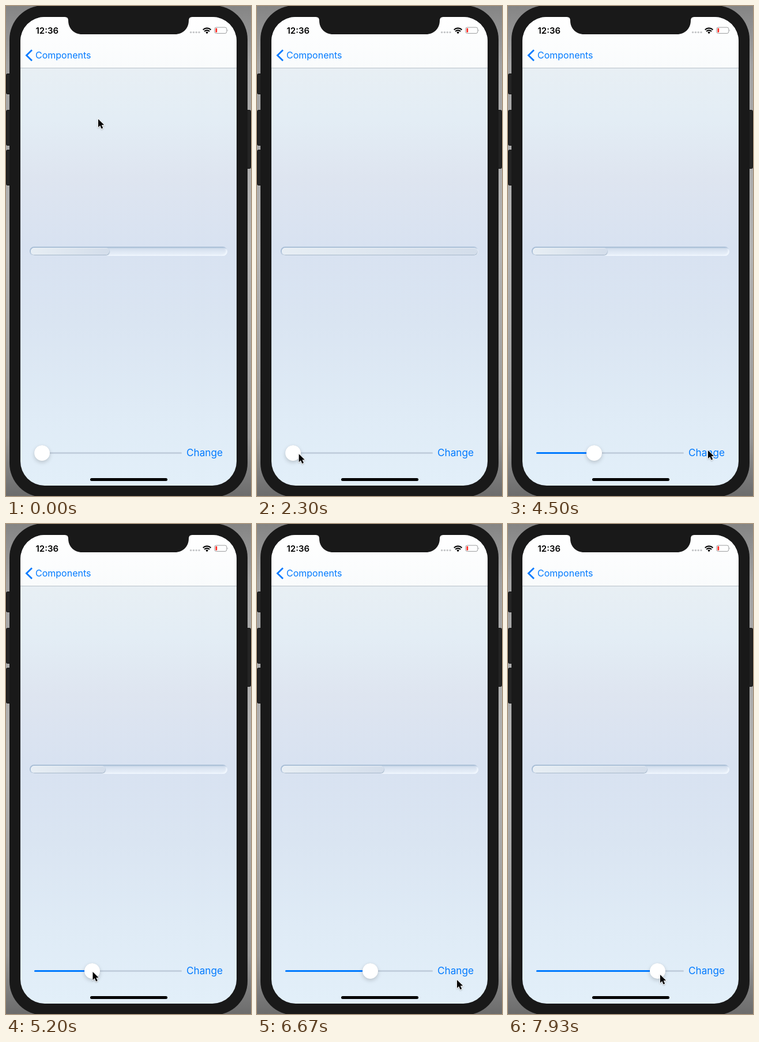
These frames come from a looping animation (425x849 px, 8000 ms). An HTML page:

```html
<!DOCTYPE html>
<html lang="en">
<head>
<meta charset="utf-8">
<title>Progress bar</title>
<style>
  html, body { margin: 0; width: 100%; height: 100%; overflow: hidden; }
  body { position: relative; background: #999; }
  svg { position: absolute; left: 0; top: 0; display: block; overflow: visible; }
  text { font-family: Inter, "Liberation Sans", sans-serif; }
  .link { fill: #007aff; }
  div { position: absolute; box-sizing: border-box; }
  #track {
    left: 41px; top: 417px; width: 343px; height: 16px; border-radius: 8px;
    background: linear-gradient(#cbd8e9, #dfe8f4 55%, #eaf2fb);
    box-shadow: inset 2px 2px 2px #a5bbd4, inset -2px -1px 3px #f2f8ff;
  }
  #fill {
    left: 43px; top: 419px; height: 12px; border-radius: 6px;
    background: linear-gradient(90deg, #e7eef4, #d3ddea);
    box-shadow: .5px 1px 1.5px #93a7be, inset .5px .5px 1px #eef4fa;
  }
  .rail { left: 49px; top: 773px; height: 3px; border-radius: 1.5px; }
  #rest { width: 256px; background: #c3d0de; }
  #done { background: #007aff; }
  #thumb {
    left: 0; top: 760.5px; width: 27px; height: 27px; border-radius: 50%;
    background: #fff; box-shadow: 0 3px 7px rgba(0,0,0,.17), 0 0 1px rgba(0,0,0,.12);
  }
</style>
</head>
<body>
<svg width="425" height="849" viewBox="0 0 425 849">
  <defs>
    <linearGradient id="desk" x2="0" y2="1">
      <stop stop-color="#858585"/><stop offset=".12" stop-color="#a3a3a3"/>
      <stop offset=".5" stop-color="#b4b4b4"/><stop offset=".88" stop-color="#979797"/>
      <stop offset="1" stop-color="#6c6c6c"/>
    </linearGradient>
    <linearGradient id="sky" gradientUnits="userSpaceOnUse" x1="0" y1="19" x2="0" y2="831">
      <stop offset=".1" stop-color="#e8eff4"/><stop offset=".22" stop-color="#e3edf5"/>
      <stop offset=".34" stop-color="#dee5f0"/><stop offset=".49" stop-color="#d8e2f1"/>
      <stop offset=".66" stop-color="#dae5f2"/><stop offset=".84" stop-color="#dfebf6"/>
      <stop offset="1" stop-color="#e2eff9"/>
    </linearGradient>
    <linearGradient id="nav" x2="0" y2="1">
      <stop stop-color="#fff"/><stop offset="1" stop-color="#f9fbfc"/>
    </linearGradient>
    <clipPath id="screen"><rect x="25" y="19" width="375" height="812" rx="42"/></clipPath>
  </defs>

  <rect width="425" height="849" fill="url(#desk)"/>
  <g fill="#242424" stroke="#101010">
    <rect x=".5" y="117.5" width="9" height="35" rx="2"/>
    <rect x=".5" y="180.5" width="9" height="61" rx="2"/>
    <rect x=".5" y="249.5" width="9" height="61" rx="2"/>
    <rect x="415.5" y="180.5" width="9" height="101" rx="2"/>
  </g>
  <rect x="6" y="-1" width="413" height="852" rx="59" fill="#191919"/>

  <g clip-path="url(#screen)">
    <rect x="25" y="19" width="375" height="812" fill="url(#sky)"/>
    <rect x="25" y="19" width="375" height="88" fill="url(#nav)"/>
    <rect x="25" y="107" width="375" height="1" fill="#b9c1c8"/>
  </g>
  <path d="M102 18v1q6 0 6 6c0 14 10 24 24 24h161c14 0 24-10 24-24q0-6 6-6v-1z" fill="#191919"/>

  <text x="51.5" y="47.5" font-size="15" font-weight="600">12:36</text>
  <g fill="#c2c4c6">
    <circle cx="320.6" cy="45.6" r="1.7"/><circle cx="325.4" cy="45.6" r="1.7"/>
    <circle cx="330.2" cy="45.6" r="1.7"/><circle cx="335" cy="45.6" r="1.7"/>
  </g>
  <g fill="none" stroke="#000" stroke-width="2.2">
    <path d="M341.8 41.2a9.8 9.8 0 0 1 13.6 0"/>
    <path d="M344.2 44a6.3 6.3 0 0 1 8.8 0"/>
  </g>
  <path d="M348.6 48.2l-2.3-2.5a3.3 3.3 0 0 1 4.6 0z"/>
  <rect x="361.8" y="37" width="21" height="10.4" rx="2.8" fill="none" stroke="#9b9c9d"/>
  <path d="M384.2 40.4q1.7 1.8 0 3.6z" fill="#9b9c9d"/>
  <rect x="363.4" y="38.6" width="2.8" height="7.2" rx="1" fill="#ff2d25"/>

  <path d="M45 76.3l-9.5 9.2 9.5 9.2" fill="none" stroke="#007aff" stroke-width="2.8"/>
  <text class="link" x="51" y="91" font-size="16">Components</text>
  <text class="link" x="313" y="780" font-size="17.2">Change</text>
  <rect x="146" y="818" width="134" height="5" rx="2.5"/>
</svg>

<div id="track"></div>
<div id="fill"></div>
<div id="rest" class="rail"></div>
<div id="done" class="rail"></div>
<div id="thumb"></div>
<svg id="cursor" width="12" height="18" viewBox="0 0 12 18">
  <path d="M0 0v14l3.2-3 2.4 5.6 2.6-1.1-2.4-5.4h4.3z" stroke="#fff" stroke-width="1.6"
        paint-order="stroke" style="filter:drop-shadow(0 1px 1px rgba(0,0,0,.25))"/>
</svg>

<script>
const LOOP = 8000;
const out = k => 1 - (1 - k) ** 2;
const glide = k => k < .5 ? 4 * k ** 3 : 1 - 4 * (1 - k) ** 3;
const drag = k => k < .5 ? 2 * k * k : 1 - 2 * (1 - k) ** 2;

// Each move: start ms, end ms, value reached, easing
const progress = { from: [.4], moves: [
  [145, 330, [.6], out], [605, 830, [.8], out], [1145, 1330, [1], out],
  [3605, 4030, [.38], out], [6590, 6770, [.585], out]
] };
const knob = { from: [62.5], moves: [
  [2550, 2930, [149.5], drag], [5380, 5730, [196.5], drag], [7350, 7930, [259.5], drag]
] };
const pointer = { from: [160, 196], moves: [
  [1610, 2400, [72, 781], glide], [2550, 2930, [159, 781], drag],
  [3050, 3470, [347, 770], glide], [4480, 5270, [150, 776], glide],
  [5380, 5730, [197, 776], drag], [5880, 6480, [347, 790], glide],
  [6910, 7200, [200, 779], glide], [7350, 7930, [264, 781], drag]
] };

function valueAt({ from, moves }, t) {
  let now = from;
  for (const [start, end, to, ease] of moves) {
    if (t < start) break;
    const k = ease(Math.min(1, (t - start) / (end - start)));
    now = now.map((v, i) => v + (to[i] - v) * k);
  }
  return now;
}

const style = id => document.getElementById(id).style;
const fill = style('fill'), done = style('done'), thumb = style('thumb'), cursor = style('cursor');

function draw(t) {
  const [p] = valueAt(progress, t);
  const [x] = valueAt(knob, t);
  const [cx, cy] = valueAt(pointer, t);
  fill.width = 339 * p + 'px';
  done.width = x - 49 + 'px';
  thumb.transform = `translateX(${x - 13.5}px)`;
  cursor.transform = `translate(${cx}px, ${cy}px)`;
}

let origin;
function tick(now) {
  origin ??= now;
  draw((now - origin) % LOOP);
  requestAnimationFrame(tick);
}
draw(0);
requestAnimationFrame(tick);
</script>
</body>
</html>
```
